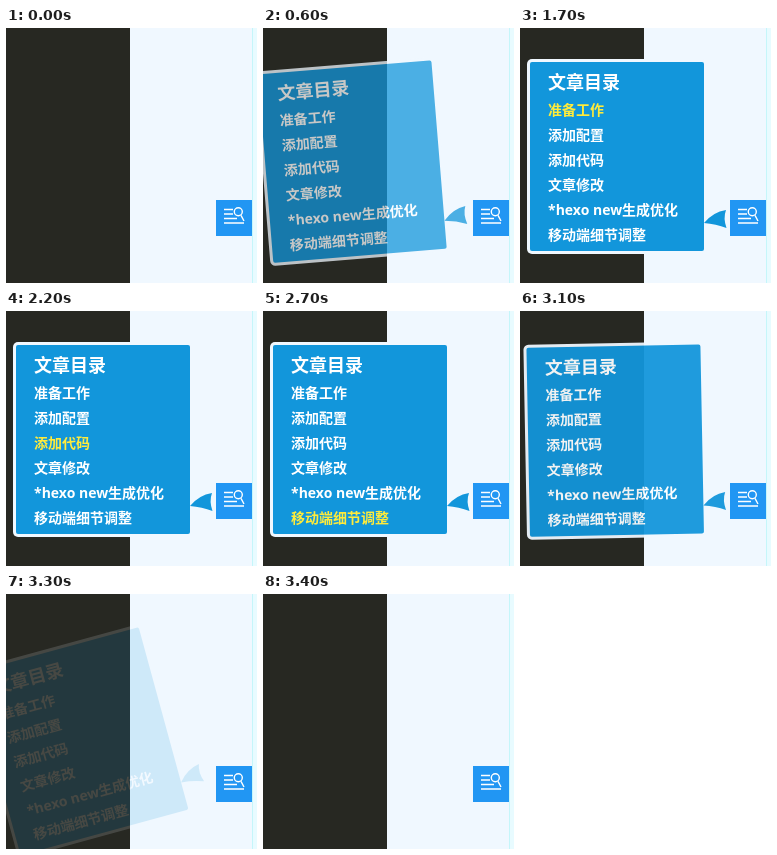
An HTML page that plays this animation: 251 px wide and 255 px high, repeating every 3800 ms.

```html
<!DOCTYPE html>
<html lang="zh">
<head>
<meta charset="utf-8">
<style>
html, body { margin: 0; width: 100%; height: 100%; overflow: hidden; background: #f0f8ff; }
svg { display: block; }
text { font: bold 14px "Noto Sans", "Noto Sans CJK SC", "Noto Sans CJK", sans-serif; fill: #fff; }
text.title { font-size: 18px; }
text.hot { fill: #ffeb3b; }
</style>
</head>
<body>
<svg width="251" height="255" viewBox="0 0 251 255">
  <rect width="251" height="255" fill="#f0f8ff"/>
  <rect width="124" height="255" fill="#272822"/>
  <rect x="246" width="5" height="255" fill="#e8fbff"/>
  <rect x="246" width="1" height="255" fill="#c5f6fa"/>
  <g id="panel">
    <rect x="7" y="31" width="180" height="195" rx="5" fill="#f0f8ff"/>
    <rect x="10" y="34" width="174" height="189" rx="2" fill="#1296db"/>
    <path d="M184 195Q193 184 206 182Q203 190 206.5 200Q196 196 184 195Z" fill="#1296db"/>
    <text class="title" x="28" y="61">文章目录</text>
  </g>
  <rect x="210" y="172" width="36" height="36" fill="#2196f3"/>
  <g fill="none" stroke="#fff" stroke-width="1.4">
    <path d="M218 181.5h9M218 186h9M218 190.5h13M218 195h20M235 187.3l3 5.7"/>
    <circle cx="232.3" cy="183.8" r="4"/>
  </g>
</svg>
<script>
const LOOP = 3800, STEP = 100;
const panel = document.getElementById('panel');
const labels = ['准备工作', '添加配置', '添加代码', '文章修改', '*hexo new生成优化', '移动端细节调整'];

const items = labels.map((label, i) => {
  const item = document.createElementNS('http://www.w3.org/2000/svg', 'text');
  item.setAttribute('x', 28);
  item.setAttribute('y', 87 + 25 * i);
  item.textContent = label;
  return panel.appendChild(item);
});

// [start time, value]; each value holds until the next start
const folded = [[0, 1], [600, .26], [700, .05], [800, 0], [3100, .06], [3200, .34], [3300, .85], [3400, 1]];
const hovered = [[0, -1], [1700, 0], [2000, 1], [2200, 2], [2300, -1], [2400, 3], [2500, 4], [2700, 5], [3000, -1]];

const valueAt = (track, t) => track.filter(([start]) => start <= t).pop()[1];

function draw(now) {
  const t = Math.floor(now % LOOP / STEP) * STEP;
  const fold = valueAt(folded, t);
  const hot = valueAt(hovered, t);
  panel.setAttribute('opacity', 1 - fold);
  panel.setAttribute('transform', `rotate(${-18 * fold} 155 225)`);
  items.forEach((item, i) => item.classList.toggle('hot', i === hot));
}

const began = performance.now();
function tick() {
  draw(performance.now() - began);
  requestAnimationFrame(tick);
}
tick();
</script>
</body>
</html>
```
